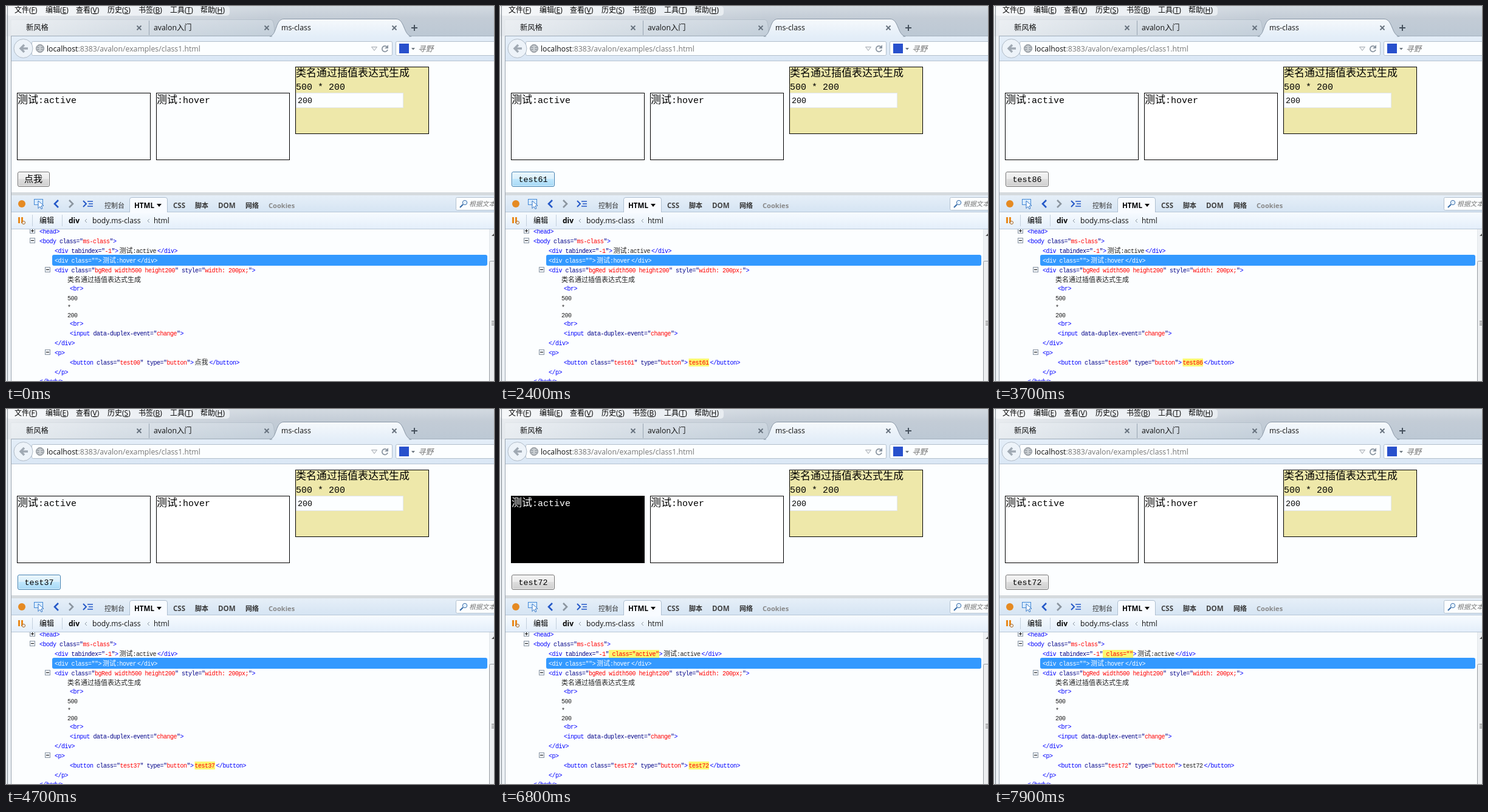
Animation, 803 px wide and 618 px high, one loop 8000 ms. Source, as an HTML page:

```html
<!DOCTYPE html>
<html lang="zh">
<head>
<meta charset="utf-8">
<style>
html, body { margin: 0; width: 803px; height: 618px; overflow: hidden; background: #fcfeff; }
svg { display: block; }
text { white-space: pre; font-family: "Open Sans", "Noto Sans CJK SC", "Noto Sans CJK", sans-serif; }
.mono { font-family: "Liberation Mono", "Noto Sans CJK SC", "Noto Sans CJK", monospace; font-weight: 300; }
</style>
</head>
<body>
<svg id="stage" width="803" height="618" viewBox="0 0 803 618">
  <defs></defs>
  <g id="chrome"></g>
  <g id="live"></g>
</svg>
<script>
const stage = document.getElementById('stage');
const chrome = document.getElementById('chrome');
const live = document.getElementById('live');

// Drawing helpers, each returns SVG markup
const esc = s => s.replace(/&/g, '&amp;').replace(/</g, '&lt;');
const rect = (x, y, w, h, fill, more = '') =>
  `<rect x="${x}" y="${y}" width="${w}" height="${h}" fill="${fill}" ${more}/>`;
const path = (d, fill, stroke = 'none', width = 1) =>
  `<path d="${d}" fill="${fill}" stroke="${stroke}" stroke-width="${width}"/>`;
const line = (d, stroke, width = 1) => path(d, 'none', stroke, width);
const circle = (x, y, r, fill, stroke = 'none') =>
  `<circle cx="${x}" cy="${y}" r="${r}" fill="${fill}" stroke="${stroke}"/>`;
const text = (x, y, s, size = 12.3, fill = '#111', more = '') =>
  `<text x="${x}" y="${y}" font-size="${size}" fill="${fill}" ${more}>${esc(s)}</text>`;
const stops = list => list.map(([at, color]) => `<stop offset="${at}" stop-color="${color}"/>`).join('');
const gradient = (id, ...list) => `<linearGradient id="${id}" x2="0" y2="1">${stops(list)}</linearGradient>`;
const across = (id, ...list) => `<linearGradient id="${id}">${stops(list)}</linearGradient>`;

// Grid fonts: [wide advance, narrow advance, latin size]
const PAGE = [17, 9, 15], BUTTON = [15, 8, 13.33], CODE = [11, 5.5, 10];
const isWide = c => c.charCodeAt(0) > 255;
const gridWidth = (s, [wide, narrow]) => [...s].reduce((w, c) => w + (isWide(c) ? wide : narrow), 0);
function grid(x, y, s, font, fill = '#000') {
  const [wide, narrow, size] = font;
  let out = '';
  for (const run of s.match(/[^\x00-\xff]+|[\x00-\xff]+/g) || []) {
    const cjk = isWide(run[0]);
    const spacing = cjk ? 0 : narrow - size * 0.6;
    out += text(x, y, run, cjk ? wide : size, fill, `class="mono" letter-spacing="${spacing.toFixed(2)}"`);
    x += gridWidth(run, font);
  }
  return out;
}

// One line of the markup tree: t tag, a attribute, v value, s plain text; capitals are marked yellow
const INK = { t: '#0000ff', a: '#000088', v: '#ff0000', s: '#222' };
function row(x, y, parts, white) {
  let out = '';
  for (const [kind, s] of parts) {
    const k = kind.toLowerCase(), marked = k !== kind, w = gridWidth(s, CODE);
    if (k === 's') x += 2;
    if (marked) out += rect(x, y - 10, w + 0.5, 13, '#fbf870');
    out += grid(x, y, s, CODE, white ? '#fff' : marked ? '#f00' : INK[k]);
    x += w + (k === 's' ? 2 : 0);
  }
  return out;
}
const attr = (name, value, mark) => mark ? [['A', ` ${name}="${value}"`]] :
  [['a', ` ${name}="`], ['v', value], ['a', '"']];

const twisty = (x, y, plus) => rect(x - 3.5, y - 4.5, 8, 8, '#eef2f6', 'stroke="#8a96a4"') +
  line(`M${x - 2} ${y - .5}h5` + (plus ? `M${x + .5} ${y - 3}v5` : ''), '#111');
const cross = (x, y) => line(`M${x - 3.5} ${y - 3.5}l7 7m0 -7l-7 7`, '#66717d', 1.8);

stage.querySelector('defs').innerHTML =
  gradient('glass', [0, '#d3dae1'], [.4, '#c3ccd6'], [1, '#bcc8d4']) +
  across('shine', [0, '#ffffffa0'], [.4, '#ffffff50'], [1, '#ffffff00']) +
  gradient('tab', [0, '#f6f9fc'], [1, '#e4eef8']) +
  gradient('backTab', [0, '#ced7e0'], [1, '#c2ced9']) +
  gradient('nav', [0, '#e4eef8'], [1, '#dae7f5']) +
  gradient('tools', [0, '#e6eff8'], [1, '#d5e4f3']) +
  gradient('crumbs', [0, '#f7fbff'], [1, '#e3eefa']) +
  gradient('normal', [0, '#f3f3f3'], [.5, '#ebebeb'], [.5, '#dddddd'], [1, '#cfcfcf']) +
  gradient('hover', [0, '#eaf6fd'], [.5, '#d9f0fc'], [.5, '#bee6fd'], [1, '#a7d9f5']) +
  gradient('pressed', [0, '#e5f4fc'], [.5, '#c4e5f6'], [.5, '#98d1ef'], [1, '#68b3db']);

function drawBrowser() {
  let out = rect(0, 0, 803, 50, 'url(#glass)') + rect(0, 0, 368, 16, '#e6ebf0', 'rx="5"');
  const menus = [[14, '文件', 'F'], [65, '编辑', 'E'], [115, '查看', 'V'], [167, '历史', 'S'],
    [218, '书签', 'B'], [270, '工具', 'T'], [320, '帮助', 'H']];

  out += path('M8 49V22.5H436Q442 22 442 49Z', 'url(#backTab)', '#b3bec9') +
    rect(0, 0, 440, 50, 'url(#shine)') +
    line('M235.5 24V48', '#98a5b2') +
    rect(8, 49, 795, 42, 'url(#nav)') + line('M8 49.5H803', '#a3b0bd') +
    path('M434 50C446 48 443 21.5 457 21.5H642C656 21.5 654 48 667 50Z', 'url(#tab)', '#8997a6') +
    rect(438, 49, 225, 2, '#e4eef8') +
    text(33, 40, '新风格') + text(243, 40, 'avalon入门') + text(453, 40, 'ms-class') +
    cross(219, 36) + cross(429, 36) + cross(639, 36) +
    line('M667 36h10m-5 -5v10', '#47525e', 2);
  for (const [x, name, key] of menus)
    out += `<text x="${x}" y="11" font-size="12" fill="#000">${name}(<tspan text-decoration="underline">${key}</tspan>)</text>`;

  out += rect(42.5, 58.5, 593, 23, '#fcfeff', 'rx="2" stroke="#b2bfcc"') +
    circle(28.5, 70, 15.5, '#edf3f9', '#b0bbc7') +
    line('M36 70H24m6 -6l-6 6l6 6', '#a0a9b3', 3.4) +
    circle(56, 70, 6.5, '#a2a8ae', '#8b9198') +
    line('M50 70h12M56 64v12M52 66q4 3 8 0M52 74q4 -3 8 0', '#e8ebee', .9) +
    `<text x="67" y="75" font-size="12.27" fill="#777">` +
    `<tspan fill="#111">localhost</tspan>:8383/avalon/examples/class1.html</text>` +
    path('M601.5 67.5h9l-4.5 6Z', '#f0f2f4', '#a5abb2') +
    line('M627 67.5A4.7 4.7 0 1 0 628 72', '#8994a0', 1.8) + path('M629 64v6h-6Z', '#8994a0') +
    rect(641.5, 58.5, 170, 23, '#fcfeff', 'rx="2" stroke="#b2bfcc"') +
    rect(647, 62, 16, 16, '#2850cc') + path('M667 69h6l-3 3.5Z', '#6d7780') +
    text(678, 75, '寻野', 12.6, '#777', 'font-style="italic"');

  out += rect(0, 50, 8, 568, '#eef2f6') + rect(8, 91, 795, 216, '#fcfeff') +
    line('M8 90.5H803', '#b5c3d1') + line('M2.5 0V618', '#7d858d') + line('M8.5 50V618', '#9ba5af');
  return out;
}

function drawDevtools() {
  let out = rect(9, 307, 794, 5, '#d5dade') + rect(9, 312, 794, 28, 'url(#tools)') +
    rect(9, 340, 794, 28, 'url(#crumbs)') + rect(9, 368, 794, 250, '#fcfeff') +
    line('M9 339.5H803M9 367.5H803', '#b7c6d6') +
    path('M203.5 340V319q0 -3.5 3.5 -3.5h55q3.5 0 3.5 3.5V340', '#f8fbff', '#aebfd0') +
    rect(204, 339, 61, 2, '#f8fbff');

  out += circle(26, 326, 6, '#e58a22') +
    rect(46.5, 318.5, 14, 9, '#d9ebfd', 'stroke="#4389d6"') +
    path('M53 321l9 8l-4 .5l2 4l-2 1l-2 -4l-3 3Z', '#fff', '#2c73c7') +
    line('M86 320l-6 6l6 6', '#2458c8', 2.6) + line('M104 320l6 6l-6 6', '#8b959f', 2.6) +
    line('M127 321l5 5l-5 5', '#2458c8', 2) + line('M134 322h9m-7 4h7m-9 4h9', '#2458c8', 1.7);

  const bold = 'font-weight="bold"';
  out += text(162, 333, '控制台', 11, '#333') + text(211, 333, 'HTML', 11.6, '#000', bold) +
    path('M248 326h8l-4 5Z', '#000') + text(311, 333, '脚本', 11, '#333', bold) +
    text(349, 333, 'DOM', 11.6, '#444', bold) + text(394, 333, '网络', 11, '#333', bold) +
    text(432, 333, 'Cookies', 11.1, '#888', bold) +
    rect(740.5, 315.5, 70, 21, '#fcfeff', 'rx="2" stroke="#b3c1cf"') +
    circle(755, 324, 3.7, '#e6f2ff', '#3a6ea8') + line('M752 327l-5 5', '#3a6ea8', 2.2) +
    text(762, 330, '根据文本', 10.8, '#777', 'font-style="italic"');

  out += rect(20, 348, 3, 10, '#e98a1d') + rect(25, 348, 3, 10, '#e98a1d') +
    circle(29, 357, 2.5, '#fff', '#9a5a18') + line('M43.5 344V363M92.5 344V363', '#c3d0dd') +
    text(55, 358, '编辑', 12, '#000') + text(103, 358, 'div', 12, '#000', bold) +
    text(142, 358, 'body.ms-class', 12.2) + text(243, 358, 'html', 12) +
    line('M133 351l-3 3l3 3M236 351l-3 3l3 3', '#8d98a4');

  out += rect(795, 368, 8, 250, '#eef1f4') + line('M795.5 368V618', '#e3e7eb') +
    path('M799 379l5 -5v5Z', '#555') +
    rect(795.5, 420.5, 20, 210, '#eceef0', 'rx="2" stroke="#979ca2"') +
    line('M799 519.5h4m-4 3h4m-4 3h4', '#666');

  out += `<svg x="9" y="368" width="786" height="250" viewBox="9 368 786 250">` +
    row(55, 375, [['t', '<head>']]) +
    row(55, 391, [['t', '<body'], ...attr('class', 'ms-class'), ['t', '>']]) +
    row(80, 439, [['t', '<div'], ...attr('class', 'bgRed width500 height200'),
      ...attr('style', 'width: 200px;'), ['t', '>']]) +
    row(99, 455, [['s', '类名通过插值表达式生成']]) +
    row(105, 469, [['t', '<br>']]) +
    row(99, 485, [['s', '500']]) + row(99, 500, [['s', '*']]) + row(99, 513, [['s', '200']]) +
    row(105, 527, [['t', '<br>']]) +
    row(105, 543, [['t', '<input'], ...attr('data-duplex-event', 'change'), ['t', '>']]) +
    row(80, 559, [['t', '</div>']]) + row(80, 575, [['t', '<p>']]) +
    row(80, 607, [['t', '</p>']]) + row(55, 622, [['t', '</body>']]) +
    twisty(43, 371, true) + twisty(43, 387) + twisty(68, 435) + twisty(68, 571) + '</svg>';
  return out;
}

const yellowBox = rect(476.5, 100.5, 219, 110, '#eee8aa', 'stroke="#000"') +
  grid(477, 116, '类名通过插值表达式生成', PAGE) + grid(477, 138, '500 * 200', PAGE) +
  rect(477.5, 143.5, 176, 24, '#fcfeff', 'stroke="#e2e7ee"') +
  grid(480, 160, '200', BUTTON);

chrome.innerHTML = drawBrowser() + drawDevtools() + yellowBox;

// Clicks: [press, release, number shown after release]
const clicks = [[1300, 1400, 75], [1900, 2000, 8], [2200, 2400, 61], [2500, 2600, 43], [2700, 2800, 90],
  [2900, 2900, 17], [3000, 3100, 26], [3200, 3300, 86],
  ...[54, 91, 37, 68, 15, 49, 83, 72].map((n, i) => [4200 + 200 * i, 4300 + 200 * i, n])];
const overButton = [[1100, 3500], [3800, 5900]];
const overBox = [[3600, 3700], [5900, 6000], [7600, 7900]];
const activeBox = [[6800, 6900], [7100, 7200], [7400, 7500]];
const within = (t, spans) => spans.some(([from, to]) => t >= from && t < to);

function drawLive(t) {
  const active = within(t, activeBox), hovered = within(t, overBox);
  const last = clicks.filter(c => c[1] <= t).pop();
  const cls = last ? 'test' + last[2] : 'test00';
  const label = last ? cls : '点我';
  const look = within(t, clicks) ? 'pressed' : within(t, overButton) ? 'hover' : 'normal';
  const edge = { normal: '#707070', hover: '#3c7fb1', pressed: '#2c628b' }[look];
  const width = last ? 23 + 8 * label.length : 53;
  const marked = t >= 1400 && t < 6900;

  let out = rect(18.5, 143.5, 219, 110, active ? '#000' : t < 6800 ? '#fcfeff' : '#fff', 'stroke="#000"') +
    grid(19, 160, '测试:active', PAGE, active ? '#fff' : '#000') +
    rect(247.5, 143.5, 219, 110, hovered ? '#a9ea00' : t < 3600 ? '#fcfeff' : '#fff', 'stroke="#000"') +
    grid(248, 160, '测试:hover', PAGE) +
    rect(19.5, 273.5, width - 1, 24, `url(#${look})`, `rx="2.5" stroke="${edge}"`) +
    rect(20.5, 274.5, width - 3, 22, 'none', 'rx="1.5" stroke="#fff" stroke-opacity=".6"') +
    grid(last ? 30.5 : 30, 290, label, BUTTON);

  if (within(t, [[400, 500]]))
    out += rect(266.5, 315.5, 36, 23, '#f1f7fd', 'rx="3" stroke="#b5c6d8"');
  out += text(275, 333, 'CSS', 11.5, '#444', 'font-weight="bold"');

  const classAttr = t < 6800 ? [] : attr('class', active ? 'active' : '', true);
  out += row(80, 407, [['t', '<div'], ...attr('tabindex', '-1'), ...classAttr, ['t', '>'],
      ['s', '测试:active'], ['t', '</div>']]) +
    rect(76, 410, 716, 18, '#3399ff', 'rx="3"') +
    row(80, 423, [['t', '<div'], ...attr('class', hovered ? 'hover' : ''), ['t', '>'],
      ['s', '测试:hover'], ['t', '</div>']], true) +
    row(105, 591, [['t', '<button'], ...attr('class', cls), ...attr('type', 'button'), ['t', '>'],
      [marked ? 'S' : 's', label], ['t', '</button>']]);
  return out;
}

const start = performance.now();
let shown = -1;
function tick() {
  const step = Math.floor((performance.now() - start) % 8000 / 100);
  if (step !== shown) live.innerHTML = drawLive((shown = step) * 100);
  requestAnimationFrame(tick);
}
tick();
</script>
</body>
</html>
```
